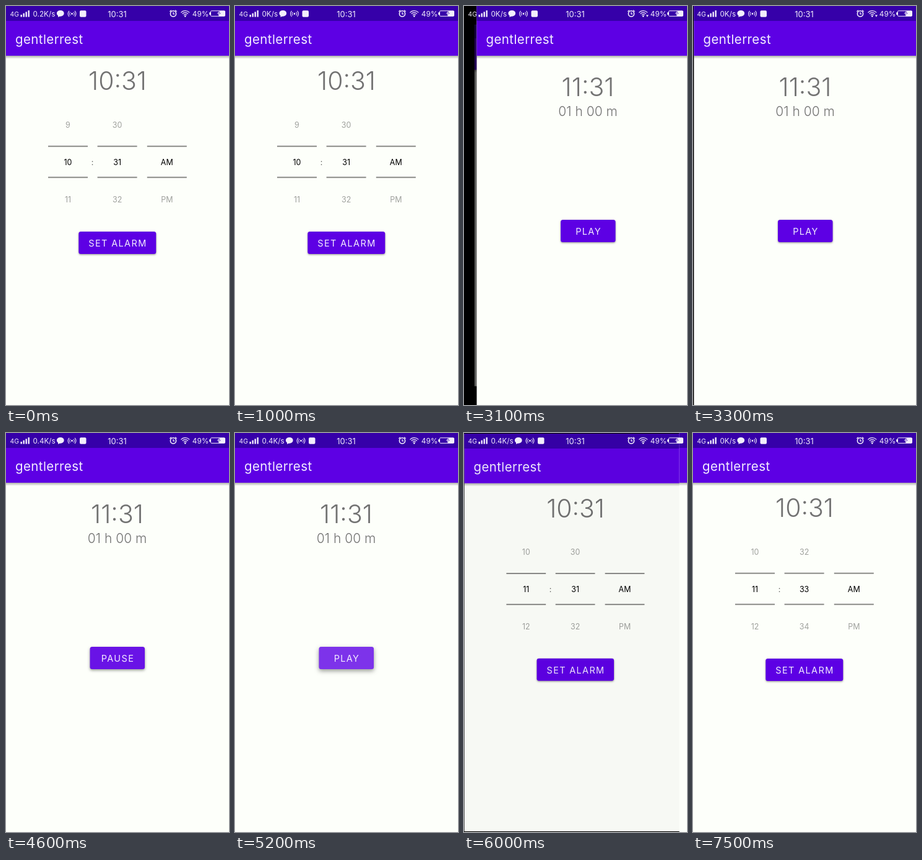
An HTML page with a canvas for the animation above (8000 ms loop, 360 px wide and 642 px high).

```html
<!DOCTYPE html>
<html lang="en">
<head>
<meta charset="utf-8">
<title>Alarm app</title>
<style>
html, body { margin: 0; width: 100%; height: 100%; overflow: hidden; background: #000; }
canvas { display: block; width: 100vw; height: 100vh; }
</style>
</head>
<body>
<canvas id="stage"></canvas>
<script>
const W = 360, H = 642, LOOP = 8000, STEP = 100;
const APP = 'gentlerrest';
const PAPER = '#fdfffa', PURPLE = '#5d00e4', DARK = '#3600a9', GRAY = '#727272';
const canvas = document.getElementById('stage');
const ctx = canvas.getContext('2d');
const dpr = window.devicePixelRatio || 1;
canvas.width = W * dpr;
canvas.height = H * dpr;

const clamp = v => Math.max(0, Math.min(1, v));
const phase = (t, start, length) => clamp((t - start) / length);
const easeOut = (p, power) => 1 - Math.pow(1 - p, power);

function rect(x, y, w, h, color) {
  ctx.fillStyle = color;
  ctx.fillRect(x, y, w, h);
}

function text(str, x, y, size, color, { align = 'center', weight = 400, spacing = 0 } = {}) {
  ctx.font = `${weight} ${size}px Inter, Roboto, sans-serif`;
  ctx.letterSpacing = spacing + 'px';
  ctx.textAlign = align;
  ctx.fillStyle = color;
  // centred text carries one trailing gap
  ctx.fillText(str, align === 'center' ? x + spacing / 2 : x, y);
  ctx.letterSpacing = '0px';
}

function arc(x, y, r, from, to) {
  ctx.beginPath();
  ctx.arc(x, y, r, from, to);
  ctx.stroke();
}

function line(...pts) {
  ctx.beginPath();
  for (let i = 0; i < pts.length; i += 2) ctx.lineTo(pts[i], pts[i + 1]);
  ctx.stroke();
}

function box(x, y, w, h, r) {
  ctx.beginPath();
  ctx.roundRect(x, y, w, h, r);
}

function appBar() {
  rect(0, 0, W, H, PAPER);
  const shade = ctx.createLinearGradient(0, 80, 0, 85);
  shade.addColorStop(0, 'rgba(0,0,0,.32)');
  shade.addColorStop(1, 'rgba(0,0,0,0)');
  rect(0, 80, W, 5, shade);
  rect(0, 0, W, 80, PURPLE);
  rect(0, 0, W, 24, DARK);
  text(APP, 15, 61, 20.5, '#f4eeff', { align: 'left', spacing: 0.4 });
}

// age: time since the finger went down
function button(label, y, w, age, hold) {
  const x = 179.8 - w / 2;
  const active = age >= 0 && age < hold + 400;
  const press = active ? 1 - phase(age, hold, 400) : 0;
  ctx.save();
  ctx.shadowColor = 'rgba(0,0,0,.4)';
  ctx.shadowBlur = (3 + 4 * press) * dpr;
  ctx.shadowOffsetY = (1.3 + 1.7 * press) * dpr;
  ctx.fillStyle = PURPLE;
  box(x, y, w, 36, 3.5);
  ctx.fill();
  ctx.restore();
  if (active) {
    ctx.save();
    box(x, y, w, 36, 3.5);
    ctx.clip();
    ctx.fillStyle = `rgba(255,255,255,${0.2 * press})`;
    ctx.beginPath();
    ctx.arc(179.8, y + 18, w * (0.3 + 0.4 * phase(age, 0, 250)), 0, 7);
    ctx.fill();
    ctx.restore();
  }
  text(label, 179.8, y + 24.3, 14.5, '#f3edff', { spacing: 1.35 });
}

function wheel(x, pos, label) {
  const base = Math.round(pos);
  for (let i = base - 2; i <= base + 2; i++) {
    const d = (i - pos) * 60;
    const alpha = clamp((90 - Math.abs(d)) / 81);
    if (alpha > 0) text(label(i), x, 255.8 + d, 12.5, `rgba(0,0,0,${alpha})`);
  }
  for (const y of [224.7, 274.7]) rect(x - 32, y, 64, 2, '#8a8a88');
}

function home(t) {
  const hour = 10 + easeOut(phase(t, 1800, 300), 2);
  const minute = 31 + 2 * easeOut(phase(t, 6600, 600), 2);
  appBar();
  text('10:31', 180, 135, 41, GRAY, { weight: 300 });
  wheel(100, hour, i => String((i - 1) % 12 + 1));
  wheel(179.6, minute, i => String(i).padStart(2, '0'));
  wheel(259.8, 0, i => ['AM', 'PM'][i] || '');
  text(':', 139.5, 255.5, 12.5, '#555');
  button('SET ALARM', 363, 125, t - 2300, 50);
}

function player(t) {
  const playing = t >= 4300 && t < 5200;
  appBar();
  text('11:31', 179.5, 145, 41, GRAY, { weight: 300 });
  text('01 h 00 m', 179.6, 176.7, 21, GRAY, { weight: 300 });
  button(playing ? 'PAUSE' : 'PLAY', 344, 88.5, t < 5000 ? t - 4100 : t - 5000, 250);
}

function netSpeed(t) {
  if (t < 900) return '0.2K/s';
  return t >= 3900 && t < 6900 ? '0.4K/s' : '0K/s';
}

function notices(dx) {
  ctx.save();
  ctx.translate(dx, 0);
  ctx.beginPath();
  ctx.ellipse(87.8, 11.8, 5.9, 4.9, 0, 0, 7);
  ctx.fill();
  ctx.beginPath();
  ctx.moveTo(84, 14);
  ctx.lineTo(84, 18);
  ctx.lineTo(88, 16);
  ctx.fill();
  ctx.beginPath();
  ctx.arc(106.5, 12.5, 1.4, 0, 7);
  ctx.fill();
  for (const r of [3.8, 6.4]) {
    arc(106.5, 12.5, r, -0.8, 0.8);
    arc(106.5, 12.5, r, Math.PI - 0.8, Math.PI + 0.8);
  }
  box(119, 7.3, 10.5, 10.5, 2);
  ctx.fill();
  ctx.restore();
}

function statusBar(t) {
  const ink = '#f2eefc';
  const speed = netSpeed(t);
  ctx.strokeStyle = ink;
  ctx.lineWidth = 1.1;
  text('4G', 6.5, 17.3, 10.3, ink, { align: 'left' });
  for (let i = 0; i < 4; i++) rect(23.5 + i * 4, 14 - i * 2.3, 2.4, 3.6 + i * 2.3, ink);
  text(speed, 43.5, 17, 11.7, ink, { align: 'left' });
  notices(speed === '0K/s' ? -10.5 : 0);
  text('10:31', 179.6, 17.6, 13, ink);

  // alarm clock
  ctx.lineWidth = 1.6;
  arc(270, 12.4, 4.6, 0, 7);
  ctx.lineWidth = 1.2;
  line(270, 9.8, 270, 12.8, 272.2, 12.8);
  line(264.3, 9, 267, 6.7);
  line(273, 6.7, 275.7, 9);

  // wifi
  const up = -Math.PI / 2;
  for (const r of [3.4, 6.4, 9.4]) arc(289.3, 17, r, up - 0.82, up + 0.82);
  ctx.fillStyle = ink;
  ctx.beginPath();
  ctx.arc(289.3, 16.4, 1.3, 0, 7);
  ctx.fill();
  if (t >= 1900 && t < 4100) {
    ctx.beginPath();
    ctx.moveTo(293.8, 14.5);
    ctx.lineTo(298, 14.5);
    ctx.lineTo(295.9, 17.8);
    ctx.fill();
  }

  text('49%', 300.8, 17, 11.8, ink, { align: 'left' });

  // battery
  ctx.lineWidth = 1;
  box(330.5, 7.8, 23, 8.6, 1);
  ctx.stroke();
  rect(328.2, 10.2, 1.8, 4, ink);
  rect(343.5, 8, 10, 8.2, ink);
  ctx.fillStyle = DARK;
  ctx.beginPath();
  for (const [x, y] of [[345.5, 8], [339.5, 12.8], [342.5, 12.8], [341, 16.4], [347, 11.6], [344, 11.6]]) ctx.lineTo(x, y);
  ctx.fill();
  ctx.fillStyle = ink;
  ctx.beginPath();
  for (const [x, y] of [[344.5, 8.8], [340.5, 12.3], [343.3, 12.3], [342.2, 15.6], [346, 12.1], [343.4, 12.1]]) ctx.lineTo(x, y);
  ctx.fill();
}

// left edge of the player page: W when hidden, 0 when it covers the stage
function pageEdge(t) {
  if (t < 5780) return W * (1 - easeOut(phase(t, 2650, 850), 3.8));
  return W * easeOut(phase(t, 5794, 350), 3.8);
}

function draw(t) {
  const edge = pageEdge(t);
  const cover = 1 - edge / W;
  ctx.setTransform(dpr, 0, 0, dpr, 0, 0);
  rect(0, 0, W, H, '#000');
  if (cover < 1) {
    const scale = 1 - 0.1 * cover;
    ctx.save();
    ctx.translate(W / 2, H / 2);
    ctx.scale(scale, scale);
    ctx.translate(-W / 2, -H / 2);
    home(t);
    ctx.restore();
    rect(0, 0, W, H, `rgba(0,0,0,${0.66 * cover})`);
  }
  if (cover > 0) {
    ctx.save();
    ctx.translate(edge, 0);
    player(t);
    ctx.restore();
  }
  statusBar(t);
}

const start = performance.now();
function tick() {
  const t = (performance.now() - start) % LOOP;
  draw(Math.floor(t / STEP) * STEP);
  requestAnimationFrame(tick);
}
tick();
</script>
</body>
</html>
```
